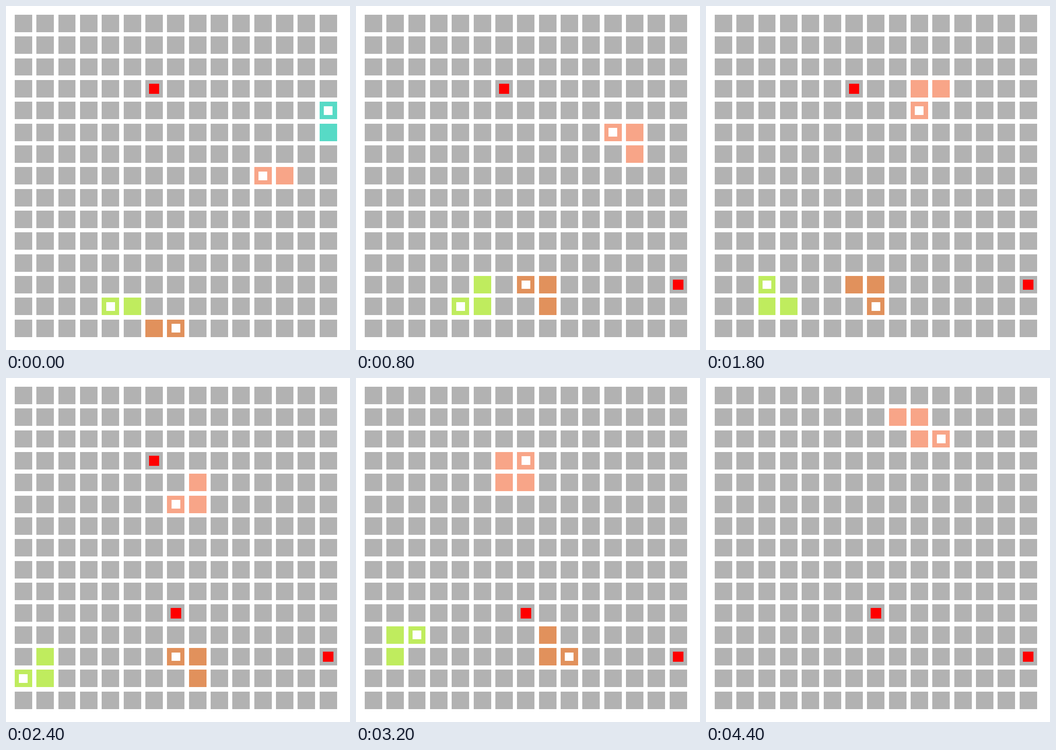
An HTML page with a canvas for the animation above (4.6 s loop, 748x748 px).

```html
<!DOCTYPE html>
<html lang="en">
<head>
<meta charset="utf-8">
<title>Snakes on a grid</title>
<style>
  html, body { margin: 0; width: 100%; height: 100%; overflow: hidden; background: #fff; }
  canvas { display: block; }
</style>
</head>
<body>
<canvas width="748" height="748"></canvas>
<script>
const ctx = document.querySelector('canvas').getContext('2d');
const CELLS = 15, UNIT = 748 / 15.8, STEP = 200, TURNS = 23;
const MOVES = { U: [0, -1], D: [0, 1], L: [-1, 0], R: [1, 0] };

// Each snake starts at its tail cell and makes its first move before turn 0.
// It vanishes when its moves run out; from turn "grows" on it is one cell longer.
const snakes = [
  { color: '#57dac6', start: [14, 5], moves: 'U' },
  { color: '#f8a588', start: [12, 7], moves: 'LURULULULDLDLULURURURDR', grows: 16 },
  { color: '#bfec5e', start: [5, 13], moves: 'LURDLULDLULDLURURDRDDL' },
  { color: '#e1915c', start: [6, 14], moves: 'RURULULDRDRULURDRDD' }
];
const foods = [
  { at: [6, 3], from: 0, to: 15 },
  { at: [14, 12], from: 4, to: TURNS },
  { at: [7, 10], from: 10, to: TURNS }
];

for (const snake of snakes) {
  snake.trail = [snake.start];
  for (const move of snake.moves) {
    const [x, y] = snake.trail.at(-1), [dx, dy] = MOVES[move];
    snake.trail.push([x + dx, y + dy]);
  }
}

// Fills a square centred in a cell, snapped to whole pixels.
function square([col, row], size, color) {
  const edge = (i, side) => Math.round((i + 0.8 + side * size / 2) * UNIT);
  const x = edge(col, -1), y = edge(row, -1);
  ctx.fillStyle = color;
  ctx.fillRect(x, y, edge(col, 1) - x, edge(row, 1) - y);
}

function draw(turn) {
  ctx.fillStyle = '#fff';
  ctx.fillRect(0, 0, 748, 748);
  for (let row = 0; row < CELLS; row++)
    for (let col = 0; col < CELLS; col++) square([col, row], 0.8, '#b2b2b2');

  for (const { at, from, to } of foods)
    if (turn >= from && turn < to) square(at, 0.48, '#f00');

  for (const { color, moves, trail, grows = TURNS } of snakes) {
    if (turn >= moves.length) continue;
    const length = turn >= grows ? 4 : 3;
    const body = trail.slice(Math.max(0, turn + 2 - length), turn + 2);
    body.forEach(cell => square(cell, 0.8, color));
    square(body.at(-1), 0.4, '#fff');
  }
}

let begin, shown;
function tick(now) {
  begin ??= now;
  const turn = Math.floor((now - begin) / STEP) % TURNS;
  if (turn !== shown) draw(shown = turn);
  requestAnimationFrame(tick);
}
draw(shown = 0);
requestAnimationFrame(tick);
</script>
</body>
</html>
```
